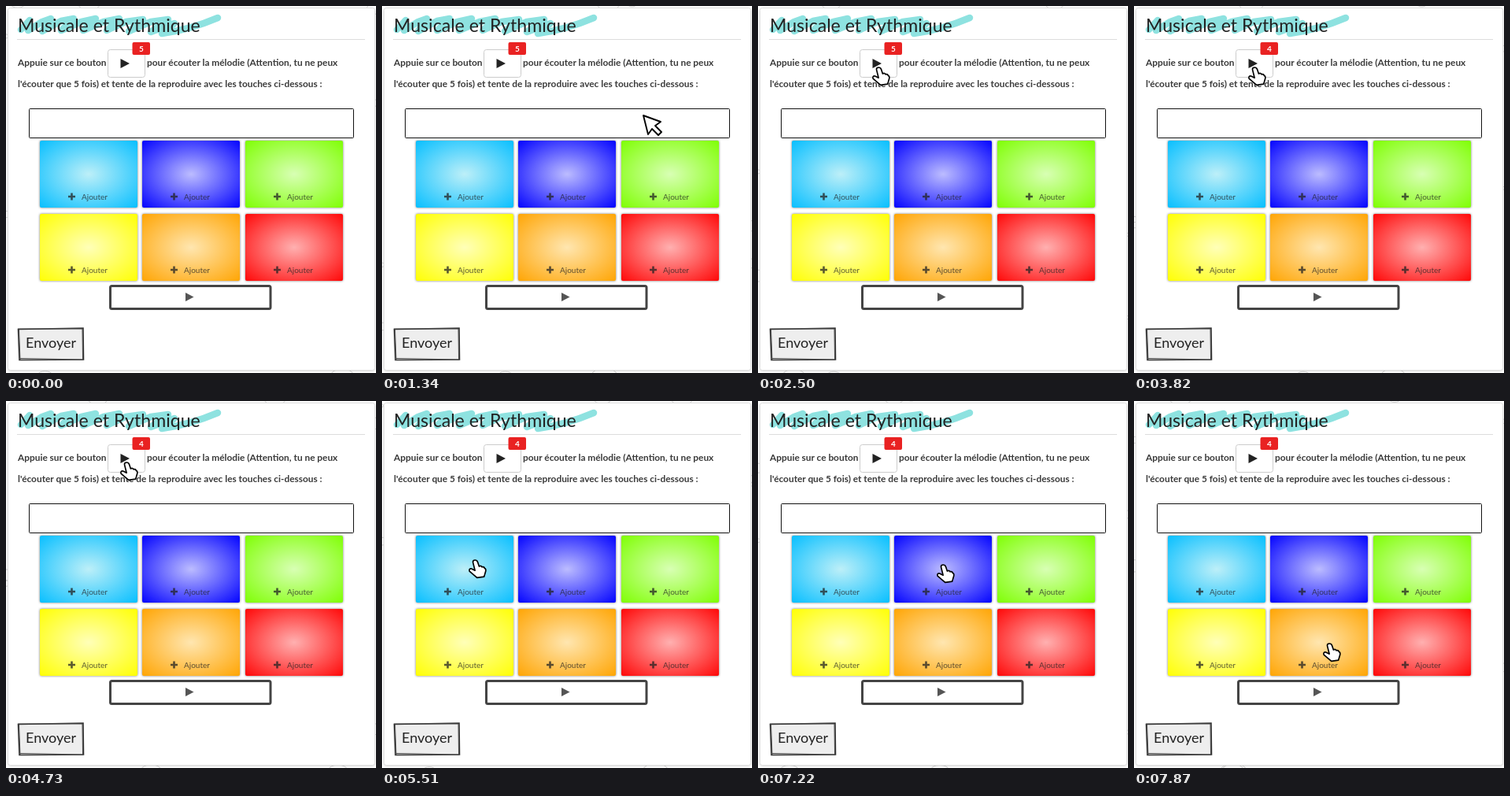
Recreate the animation shown at these times as an HTML page. Size 470 by 466 pixels, loop 8000 ms.

```html
<!DOCTYPE html>
<html lang="fr">
<head>
<meta charset="utf-8">
<title>Musicale et Rythmique</title>
<style>
html, body { margin: 0; width: 100%; height: 100%; overflow: hidden; background: #fff; }
svg { display: block; width: 470px; height: 466px; font-family: Lato, sans-serif; }
.body { font-size: 11.86px; font-weight: 700; fill: #3a3a3a; }
.hand { fill: #222; }
.tile { filter: drop-shadow(0 0 1.5px #0008); }
.panel { filter: drop-shadow(0 1px 1px #0002); }
.cursor { fill: #fff; stroke: #000; stroke-width: 1.9; stroke-linejoin: round; }
</style>
</head>
<body>
<svg viewBox="0 0 470 466">
  <defs id="defs"></defs>
  <path id="doodles" fill="none" stroke="#d4d4d4"/>
  <rect class="panel" x="2.5" y="2.5" width="466" height="460" rx="3" fill="#fff" stroke="#ddd"/>

  <path d="M19 30L30 18L28 31L46 20L57 16L46 32L70 19L86 16L70 31L96 20L114 16L98 31L124 20L144 16L128 31L152 20L174 17L156 32L184 20L206 17L184 33L214 22L198 35Q234 30 269 15"
        fill="none" stroke="#8ee2e0" stroke-width="8.5" stroke-linecap="round" stroke-linejoin="round"/>
  <text class="hand" x="15" y="33" font-size="23.1">Musicale et Rythmique</text>
  <path d="M14 42.5H456" stroke="#ddd"/>

  <text class="body" x="15" y="76">Appuie sur ce bouton</text>
  <text class="body" x="179" y="76">pour écouter la mélodie (Attention, tu ne peux</text>
  <text class="body" x="15" y="102.5">l'écouter que 5 fois) et tente de la reproduire avec les touches ci-dessous :</text>
  <rect x="129.5" y="55.5" width="47" height="35" rx="3" fill="#fff" stroke="#ccc"/>
  <path d="M145.5 67L157 73L145.5 79Z" fill="#222"/>
  <rect x="160.5" y="46" width="22.5" height="16" rx="2" fill="#e92222"/>
  <text id="plays" x="172" y="58" font-size="10" font-weight="700" fill="#fff" text-anchor="middle">5</text>

  <rect x="29.5" y="130.5" width="412" height="37" rx="1" fill="#fff" stroke="#111"/>
  <g id="tiles"></g>

  <rect x="132.5" y="355.5" width="203.5" height="29" rx="2" fill="#fff" stroke="#444" stroke-width="3"/>
  <path d="M228 364L238.5 369.5L228 375Z" fill="#555"/>

  <path d="M15.5 410.5L98 409L98.5 449L17 449.5Z" fill="#eee" stroke="#333" stroke-width="1.6"/>
  <path d="M15 410L97 410L97.5 449M18 447.5L98 449M16.5 411L18 449" fill="none" stroke="#444"/>
  <text class="hand" x="25" y="434" font-size="18">Envoyer</text>

  <g id="cursor" class="cursor">
    <path id="arrow" d="M0 0L22 8L15 13L23 21L19 25L11 17L6 24Z"/>
    <path id="pointer" transform="scale(.88)" d="M-1 15L-4 3Q-4 0 -1 0Q2 0 3 3L5 9Q8 7.5 9 10Q12 9 13 12Q15 12 14.5 16L13 21L12 24L2 25.5Q-2 22 -9 16Q-10 12 -6 12.5Z"/>
  </g>
</svg>
<script>
const $ = id => document.getElementById(id);
const LOOP = 8000, STEP = LOOP / 61;

const colors = [
  ['#bdeff8', '#08bfff'], ['#bcbcff', '#0404ff'], ['#d8ffb4', '#7fff04'],
  ['#ffffb8', '#ffff04'], ['#ffe6b0', '#ffa504'], ['#ffb0b0', '#ff0808']
];
const buttons = [{ x: 129, y: 55, w: 48, h: 36 }];
colors.forEach(([inner, outer], i) => {
  const x = Math.round(43 + (i % 3) * 130.4), y = i < 3 ? 171 : 264;
  buttons.push({ x, y, w: 124, h: 85 });
  $('defs').innerHTML += `<radialGradient id="glow${i}" r=".707">
    <stop stop-color="${inner}"/><stop offset="1" stop-color="${outer}"/></radialGradient>`;
  $('tiles').innerHTML += `<g transform="translate(${x} ${y})">
    <rect class="tile" width="124" height="85" rx="2" fill="url(#glow${i})"/>
    <g opacity=".75"><path d="M36 71h9M40.5 66.5v9" stroke="#222" stroke-width="2.6"/>
    <text class="hand" x="53" y="75" font-size="10">Ajouter</text></g></g>`;
});

// Cursor stops: time, x, y
const route = [
  [0, 530, 298], [800, 500, 271], [1050, 428, 213], [1300, 332, 139],
  [1400, 332, 139], [2300, 154, 78], [4800, 154, 78], [5400, 119, 202],
  [6450, 119, 202], [6850, 236, 208], [7250, 236, 208], [7750, 249, 308],
  [LOOP, 249, 308]
];

function cursorAt(t) {
  const i = route.findIndex(stop => stop[0] > t);
  const [t0, x0, y0] = route[i - 1], [t1, x1, y1] = route[i];
  const p = (t - t0) / (t1 - t0);
  return [x0 + (x1 - x0) * p, y0 + (y1 - y0) * p];
}

// Faint pencil loops peeking out around the panel
function doodles(seed) {
  const random = () => (seed = (seed * 16807) % 2147483647) / 2147483647;
  let d = '';
  for (let i = 0; i < 8; i++) {
    const side = i % 4, along = random() * 440;
    const x = side < 2 ? along : side === 2 ? -2 : 472;
    const y = side > 1 ? along : side ? 468 : -2;
    const r = 4 + random() * 12;
    d += `M${x - r} ${y}a${r} ${r / 2} 0 1 0 ${2 * r} 0a${r} ${r / 2} 0 1 0 ${-2 * r} 0`;
  }
  return d;
}

function draw(now) {
  const frame = Math.floor((now % LOOP) / STEP), t = frame * STEP;
  const [x, y] = cursorAt(t);
  const over = buttons.some(b => x >= b.x && x <= b.x + b.w && y >= b.y && y <= b.y + b.h);
  $('cursor').setAttribute('transform', `translate(${x} ${y})`);
  $('arrow').style.display = over ? 'none' : '';
  $('pointer').style.display = over ? '' : 'none';
  $('plays').textContent = t < 2900 ? 5 : 4;
  $('doodles').setAttribute('d', doodles(frame * 7919 + 4321));
}

const start = performance.now();
function tick() {
  draw(performance.now() - start);
  requestAnimationFrame(tick);
}
tick();
</script>
</body>
</html>
```
